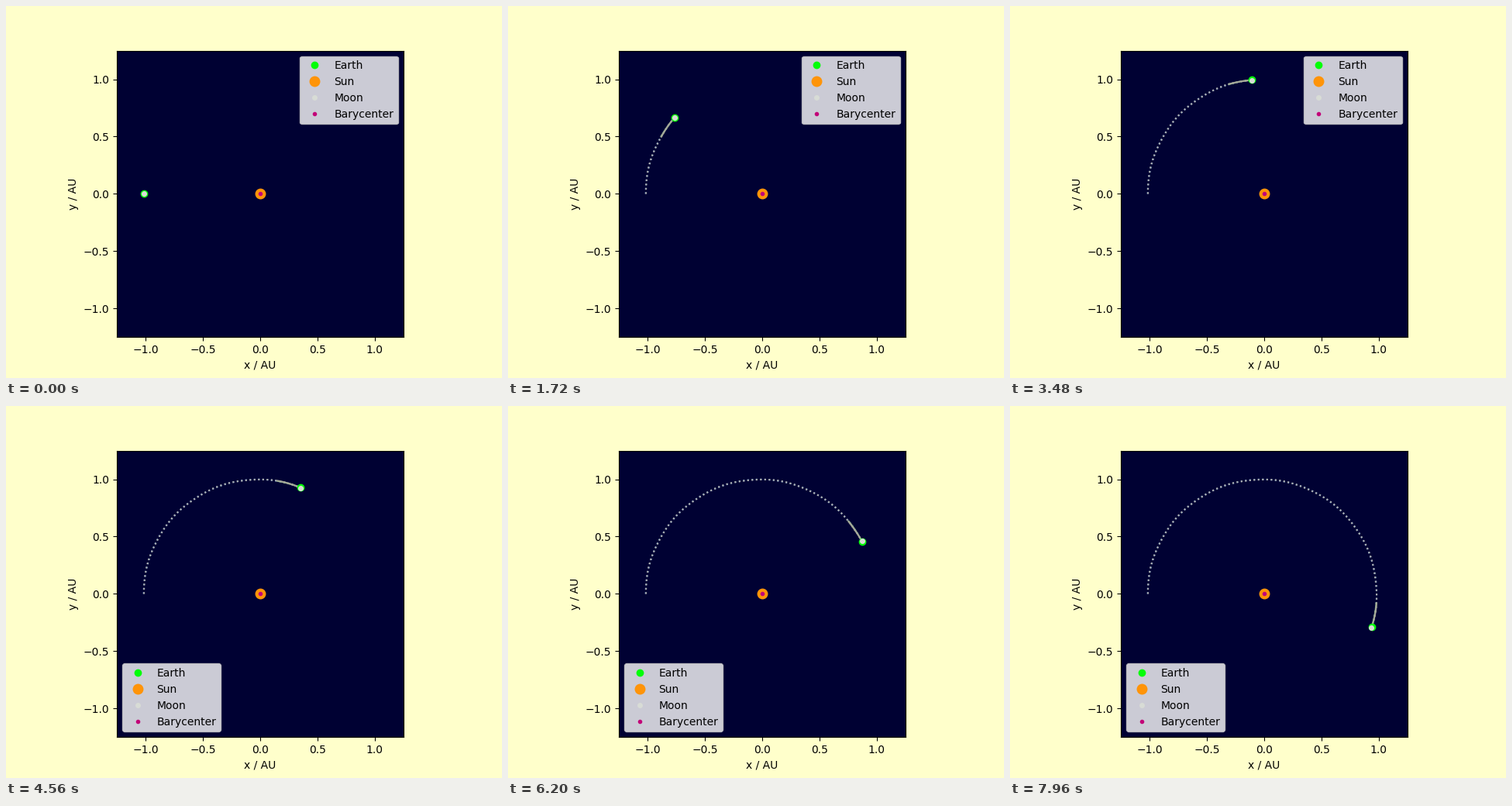
A matplotlib script that plays this animation: 640x480 px, repeating every 8000 ms.

```python
import numpy as np
import matplotlib.pyplot as plt
from matplotlib.animation import FuncAnimation

FRAMES = 200
INTERVAL = 40
TAIL = 13            # days drawn as a solid line

AXIS, ECC, YEAR = 0.999, 0.0177, 364.4
MOON_DIST, MONTH = 0.00257, 27.08


def earth_orbit(day):
    """Clockwise Kepler orbit around the origin, starting at aphelion."""
    mean = np.pi + 2 * np.pi * day / YEAR
    anomaly = mean.copy()
    for _ in range(6):
        anomaly -= (anomaly - ECC * np.sin(anomaly) - mean) / (1 - ECC * np.cos(anomaly))
    x = AXIS * (np.cos(anomaly) - ECC)
    y = -AXIS * np.sqrt(1 - ECC**2) * np.sin(anomaly)
    return np.array([x, y])


days = np.arange(FRAMES, dtype=float)
phase = 2 * np.pi * days / MONTH
earth = earth_orbit(days)
moon = earth + MOON_DIST * np.array([np.cos(phase), -np.sin(phase)])

fig, ax = plt.subplots(figsize=(6.4, 4.8), dpi=100, facecolor="xkcd:ivory")
ax.set_facecolor("xkcd:very dark blue")
ax.set_aspect("equal")
ax.set(xlim=(-1.25, 1.25), ylim=(-1.25, 1.25), xlabel="x / AU", ylabel="y / AU")


def trail(style, color):
    return ax.plot([], [], style, color=color, lw=1.5)[0]


def body(label, color, size):
    return ax.plot([0], [0], "o", color=color, ms=size, label=label)[0]


earth_path = trail(":", "#7da3cf")
moon_path = trail(":", "#acacac")
earth_tail = trail("-", "#7fae86")
moon_tail = trail("-", "#a6a798")

earth_dot = body("Earth", "xkcd:bright green", 6)
body("Sun", "xkcd:tangerine", 9)
moon_dot = body("Moon", "xkcd:light grey", 4)
body("Barycenter", "xkcd:magenta", 3)
ax.legend(loc="best")

BODIES = [
    (earth, earth_path, earth_tail, earth_dot),
    (moon, moon_path, moon_tail, moon_dot),
]


def update(i):
    end = i + 1
    for pos, path, tail, dot in BODIES:
        path.set_data(pos[:, :end])
        tail.set_data(pos[:, max(0, end - TAIL):end])
        dot.set_data(pos[:, i:end])
    return [artist for group in BODIES for artist in group[1:]]


def init():
    return update(0)


anim = FuncAnimation(fig, update, frames=FRAMES, init_func=init,
                     interval=INTERVAL, repeat=True, repeat_delay=0)
plt.show()
```
